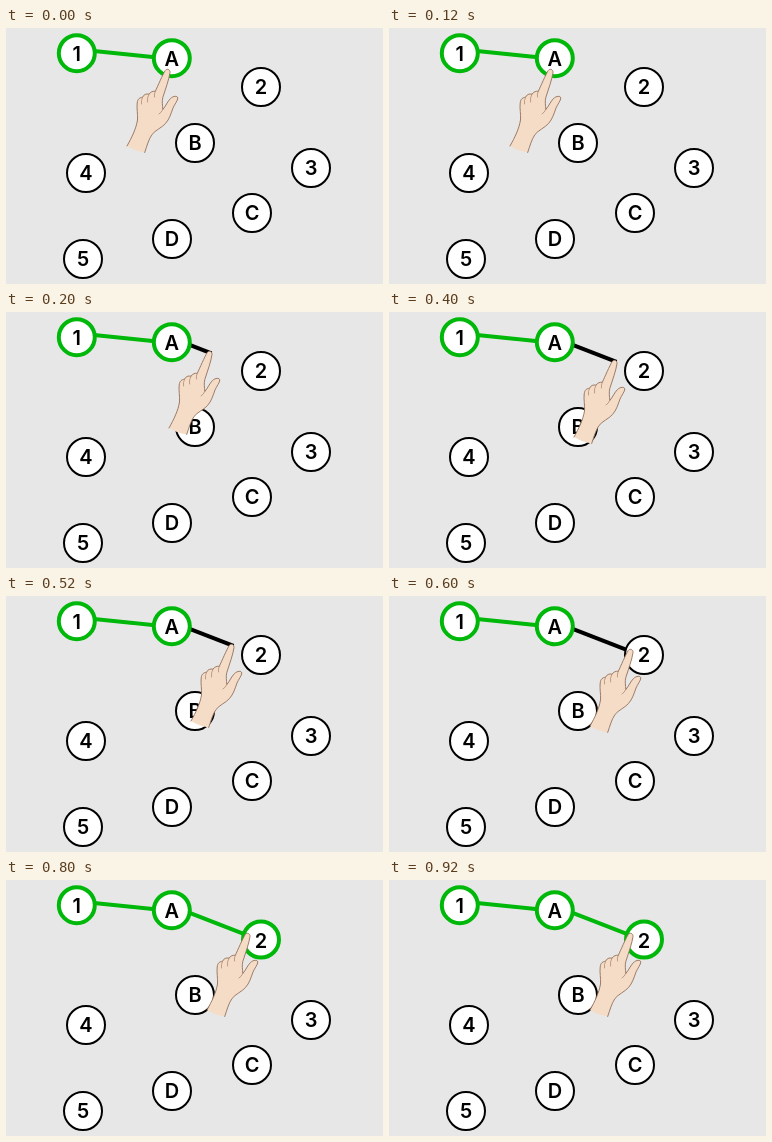
An HTML page that plays this animation: 377x256 px, repeating every 1 s.

```html
<!DOCTYPE html>
<html lang="en">
<head>
<meta charset="utf-8">
<title>Connect the circles</title>
<style>
html, body { margin: 0; width: 100%; height: 100%; overflow: hidden; background: #e7e7e7; }
svg { display: block; width: 100vw; height: 100vh; }
text { font: 600 20px Inter, Arial, sans-serif; text-anchor: middle; }
.node circle { fill: #fff; stroke: #000; stroke-width: 2; }
.node.on circle { stroke: #00b80a; stroke-width: 4; }
line { stroke: #000; stroke-width: 4; }
line.on { stroke: #00b80a; }
.skin { fill: #f5dcc6; }
.edge { fill: none; stroke: #93705c; stroke-width: .9; stroke-linecap: round; stroke-linejoin: round; }
.fold { fill: none; stroke: #b08c75; stroke-width: .8; stroke-linecap: round; }
</style>
</head>
<body>
<svg viewBox="0 0 377 256">
  <line class="on" x1="88" y1="22.9" x2="149" y2="29.2"/>
  <line id="link" x1="183" y1="32.7"/>
  <g id="nodes"></g>
  <g id="hand">
    <path class="skin" d="M121 118 C126 109 130 101 131.500 92 C132 86 130.500 81 131.200 75 C131.700 70.500 134 69.500 136.500 69.300 C137.500 66.500 140.500 65.500 143 66.200 C144.500 63.800 147 63 149.300 63.300 C152 57.500 156.500 47 159.200 42.500 C160.800 40.300 164.300 41.300 164 44.500 C163.200 51 159.500 61 156.800 69.500 C155.800 73 156.500 77.500 156.800 81.500 C159.500 78.500 161.500 73.500 164.500 70.500 C167.500 67.800 171.500 67.600 171.800 70 C171.800 72.500 168.500 76.500 167 80 C165 85.500 163.500 91 159.500 95.500 C155.500 100 149.500 102 146 106.500 C142.500 111.500 141 118 138.700 124.500 C132.500 123.500 126.500 121.500 121 118 Z"/>
    <path class="edge" d="M121 118 C126 109 130 101 131.500 92 C132 86 130.500 81 131.200 75 C131.700 70.500 134 69.500 136.500 69.300 C137.500 66.500 140.500 65.500 143 66.200 C144.500 63.800 147 63 149.300 63.300 C152 57.500 156.500 47 159.200 42.500 C160.800 40.300 164.300 41.300 164 44.500 C163.200 51 159.500 61 156.800 69.500 C155.800 73 156.500 77.500 156.800 81.500 C159.500 78.500 161.500 73.500 164.500 70.500 C167.500 67.800 171.500 67.600 171.800 70 C171.800 72.500 168.500 76.500 167 80 C165 85.500 163.500 91 159.500 95.500 C155.500 100 149.500 102 146 106.500 C142.500 111.500 141 118 138.700 124.500"/>
    <path class="fold" d="M136.500 69.300 Q134.800 72.500 135.500 76 M143 66.200 Q140.800 69.500 141.500 74 M149.300 63.300 Q147.800 66 148.500 69 M156.800 81.500 Q155.500 84.500 153 86"/>
  </g>
</svg>
<script>
const SVG = "http://www.w3.org/2000/svg";
const nodes = document.getElementById("nodes");
const link = document.getElementById("link");
const hand = document.getElementById("hand");

function make(name, parent, attrs) {
  const el = parent.appendChild(document.createElementNS(SVG, name));
  for (const key in attrs) el.setAttribute(key, attrs[key]);
  return el;
}

function addNode(label, x, y) {
  const g = make("g", nodes, { class: "node" });
  make("circle", g, { cx: x, cy: y });
  make("text", g, { x }).textContent = label;
  const setOn = (on) => {
    const cy = on ? y + 0.5 : y;
    g.classList.toggle("on", on);
    g.firstChild.setAttribute("cy", cy);
    g.firstChild.setAttribute("r", on ? 18 : 19);
    g.lastChild.setAttribute("y", cy + (on ? 8 : 7.3));
  };
  setOn(false);
  return setOn;
}

addNode("1", 70.8, 24.7)(true);
addNode("A", 165.8, 29.7)(true);
const setTwo = addNode("2", 255, 59);
addNode("B", 189, 115);
addNode("3", 305, 140);
addNode("4", 80, 145);
addNode("C", 246, 185);
addNode("D", 166, 211);
addNode("5", 77, 231);

// Hand shift x, y; line end x (0 hides the line); whether 2 is joined
const steps = [
  [0, 0, 0, false],
  [42, -2, 205.5, false],
  [64, 7, 227.5, false],
  [80, 12, 239, false],
  [80, 12, 239, true]
];
const HOLD = 200;
let shown = -1;

function show(i) {
  if (i === shown) return;
  shown = i;
  const [dx, dy, end, joined] = steps[i];
  hand.setAttribute("transform", `translate(${dx} ${dy})`);
  link.style.display = end ? "" : "none";
  link.setAttribute("x2", end);
  link.setAttribute("y2", 32.7 + (end - 183) * 0.385);
  link.classList.toggle("on", joined);
  setTwo(joined);
}

const start = performance.now();
function tick() {
  show(Math.floor((performance.now() - start) / HOLD) % steps.length);
  requestAnimationFrame(tick);
}
tick();
</script>
</body>
</html>
```
